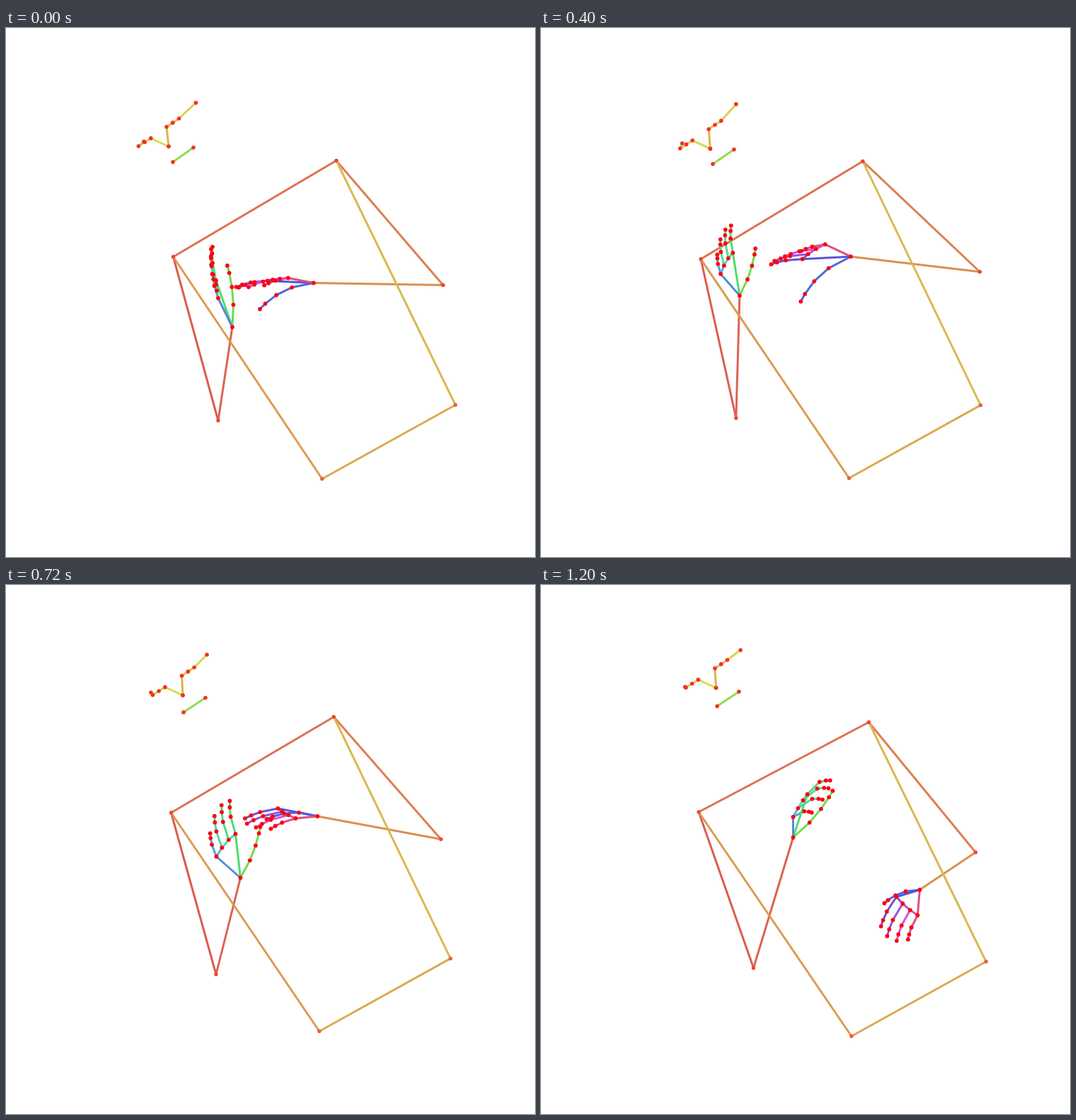
An HTML page with a canvas that plays this animation: 748 by 748 pixels, repeating every 1280 ms.

```html
<!DOCTYPE html>
<html lang="en">
<head>
<meta charset="utf-8">
<title>Pose skeleton</title>
<style>
html, body { margin: 0; width: 100%; height: 100%; overflow: hidden; background: #fff; }
canvas { display: block; }
</style>
</head>
<body>
<canvas id="stage" width="748" height="748"></canvas>
<script>
const ctx = document.getElementById('stage').getContext('2d');
const LOOP = 1280, STEP = 80;

// Key times shared by all joint paths
const TIMES = [0, 320, 560, 720, 880, 1040, 1200];

const shoulderR = [[236.5, 323.5], [225.5, 326], [230.5, 327.5], [233.5, 322], [230, 319.5], [225.5, 324], [223, 321]];
const shoulderL = [[467, 187.5], [457, 188], [453.5, 189], [463.5, 186.5], [469, 188.5], [464, 196.5], [463.5, 194]];
const hip = [[447, 637.5], [437, 638.5], [435.5, 631], [443, 631], [445.5, 635.5], [439.5, 636], [439, 638]];
const nose = [[230, 167.5], [241, 168], [235, 174.5], [250, 156], [260, 137], [253.5, 140.5], [247.5, 145.5]];

// Hand vectors are relative: knuckles and thumb tip to the wrist, reach along the middle finger
const armR = {
  elbow: [[300, 555], [278.5, 553], [277, 548.5], [297, 550.5], [315, 546.5], [317, 543.5], [300.5, 541.5]],
  wrist: [[320, 423], [274.5, 378], [311, 393], [331.5, 414], [363, 401], [394.5, 371], [356.5, 357]],
  index: [[-23, -66], [-14, -60], [-1, -63], [-7, -62], [-1, -63], [24, -61], [20, -61]],
  little: [[-20, -41], [-25, -31], [-31, -32], [-34, -30], [-14, -32], [14, -27], [0, -29]],
  reach: [[-7, -50], [-1, -37], [-13, -52], [-10, -49], [17, -27], [37, -19], [36, -17]],
  thumb: [[-7, -87], [13, -70], [40, -63], [28, -72], [26, -76], [56, -72], [56, -66]],
  thumbBow: .05, side: -1, swing: 8,
  sizes: [.95, 1, .92, .68],
  hues: { thumb: 106, fingers: [137, 146, 156, 206], palm: [132, 143, 165, 198, 215] }
};
const armL = {
  elbow: [[618, 363.5], [623, 350.5], [613, 336.5], [615, 359.5], [612, 381], [608, 385.5], [614.5, 378]],
  wrist: [[435, 360.5], [445.5, 332.5], [419.5, 308.5], [440.5, 327], [476.5, 365.5], [511, 412], [535.5, 431]],
  index: [[-65, -3], [-68, 2], [-67, 4], [-56, -11], [-44, -20], [-37, -7], [-33, 10]],
  little: [[-36, -7], [-34, -15], [-41, -18], [-31, 3], [-24, 27], [-12, 39], [-3, 36]],
  reach: [[-48, 11], [-44, 13], [-57, 3], [-50, 17], [-38, 40], [-30, 46], [-22, 46]],
  thumb: [[-76, 37], [-73, 59], [-66, 61], [-72, 4], [-69, -31], [-60, -15], [-50, 19]],
  thumbBow: .1, side: 1, swing: 0,
  sizes: [.92, 1, .93, .72],
  hues: { thumb: 230, fingers: [251, 273, 303, 332], palm: [245, 258, 288, 325, 343] }
};

// Smooth curve through a path's points at time t
function at(path, t) {
  const last = TIMES.length - 1;
  let i = 0;
  while (i < last - 1 && t >= TIMES[i + 1]) i++;
  const p = Math.max(i - 1, 0), n = Math.min(i + 2, last);
  const h = TIMES[i + 1] - TIMES[i], u = (t - TIMES[i]) / h, v = 1 - u;
  return [0, 1].map(k => {
    const a = path[i][k], b = path[i + 1][k];
    const da = (b - path[p][k]) / (TIMES[i + 1] - TIMES[p]) * h;
    const db = (path[n][k] - a) / (TIMES[n] - TIMES[i]) * h;
    return a * v * v * (1 + 2 * u) + da * u * v * v + b * u * u * (3 - 2 * u) - db * u * u * v;
  });
}

const add = (a, b) => [a[0] + b[0], a[1] + b[1]];
const scale = (a, k) => [a[0] * k, a[1] * k];
const mix = (a, b, k) => add(scale(a, 1 - k), scale(b, k));
const smooth = u => { u = Math.min(Math.max(u, 0), 1); return u * u * (3 - 2 * u); };

function rotate([x, y], degrees) {
  const r = degrees * Math.PI / 180, c = Math.cos(r), s = Math.sin(r);
  return [x * c - y * s, x * s + y * c];
}

function line(a, b, hue) {
  ctx.strokeStyle = `hsl(${hue} 66% 59%)`;
  ctx.beginPath();
  ctx.moveTo(...a);
  ctx.lineTo(...b);
  ctx.stroke();
}

function chain(pts, hue, turn = 0) {
  for (let i = 1; i < pts.length; i++) line(pts[i - 1], pts[i], hue + turn * (i - 1));
}

function dots(pts, color, r) {
  ctx.fillStyle = color;
  for (const [x, y] of pts) {
    ctx.beginPath();
    ctx.arc(x, y, r, 0, 7);
    ctx.fill();
  }
}

// Points at the given fractions of a bowed line
function bowed(base, vec, bow, stops) {
  return stops.map(s => {
    const k = bow * 4 * s * (1 - s);
    return add(base, [vec[0] * s - vec[1] * k, vec[1] * s + vec[0] * k]);
  });
}

function drawBody(t) {
  const rs = at(shoulderR, t), ls = at(shoulderL, t), rh = at(hip, t);
  const re = at(armR.elbow, t), le = at(armL.elbow, t);
  const lh = add(rh, scale([188.5, -104.5], (rh[1] - rs[1]) / 314));
  chain([rs, re, at(armR.wrist, t)], 5, 3);
  chain([rs, ls, le, at(armL.wrist, t)], 14, 6.5);
  chain([rs, rh, lh, ls], 32, 6.5);
  return { upper: [rs, ls, re, le], hips: [rh, lh] };
}

// The head turns as it moves sideways and tilts as it rises
function drawFace(t) {
  const n = at(nose, t), turn = n[0] - 230, tilt = 168 - n[1];
  const from = (x, y) => add(n, [x, y]);
  const eye = (x, y, dx, dy) => [0, 1, 2].map(i => from(x + dx * i, y + dy * i));
  const left = [n, ...eye(-3 + .08 * turn, -27.7, 8.8, -5.9), from(38.5 - .22 * turn, -62 + .38 * tilt)];
  const right = [n, ...eye(-25.2, -11.6, -8.7, 5.6), from(-35 - .5 * turn, -7 + .25 * tilt)];
  const corner = from(6 - .25 * turn, 22 + .17 * tilt);
  const lips = [corner, add(corner, [29 + .1 * turn, -20.5])];
  chain(left, 43, 4);
  chain(right, 62, 6);
  chain(lips, 92);
  return [...left, ...right, ...lips];
}

function drawHand(arm, t) {
  const { hues, side, swing } = arm;
  const wrist = at(arm.wrist, t), reach = at(arm.reach, t);
  const index = at(arm.index, t), little = at(arm.little, t);
  const bend = swing ? smooth((t - 700) / 180) : 0;
  const curl = .05 + .12 * bend, fan = swing * bend - 2;
  const thumb = bowed(wrist, at(arm.thumb, t), arm.thumbBow, [0, .36, .65, .88, 1]);
  const fingers = arm.sizes.map((size, i) => {
    const knuckle = scale(mix(index, little, i / 3), i % 3 ? 1.045 : 1);
    const vec = rotate(scale(reach, size), fan * (i - 1));
    return bowed(add(wrist, knuckle), vec, curl * side, [0, .48 + curl * .9, .78 + curl * .5, 1]);
  });
  chain(thumb, hues.thumb);
  fingers.forEach((f, i) => chain(f, hues.fingers[i]));
  const palm = [wrist, ...fingers.map(f => f[0]), wrist];
  hues.palm.forEach((hue, i) => line(palm[i], palm[i + 1], hue));
  return [...thumb, ...fingers.flat()];
}

function draw(t) {
  ctx.fillStyle = '#fff';
  ctx.fillRect(0, 0, 748, 748);
  ctx.lineWidth = 3;
  ctx.lineCap = 'round';
  const body = drawBody(t);
  const face = drawFace(t);
  const hands = [armR, armL].flatMap(arm => drawHand(arm, t));
  dots(body.upper, '#f04432', 2.7);
  dots(body.hips, '#ea5f42', 2.7);
  dots(face, '#f6301f', 2.8);
  dots(hands, '#fc0410', 2.9);
}

function tick() {
  draw(Math.floor(performance.now() % LOOP / STEP) * STEP);
  requestAnimationFrame(tick);
}
tick();
</script>
</body>
</html>
```
